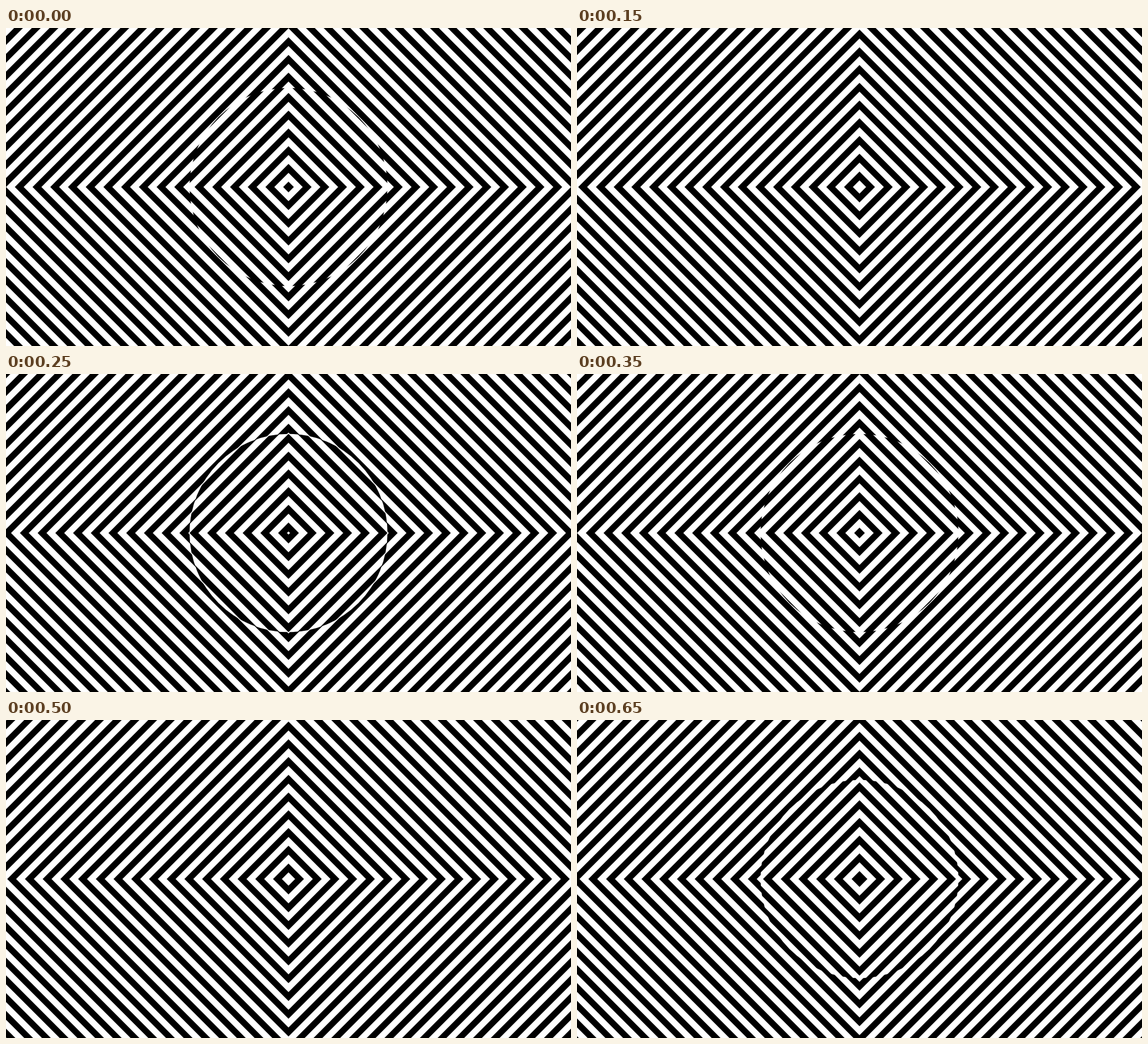
Write an HTML page with a canvas that moves like this. It is 998 px wide and 561 px high and loops after 700 ms.

```html
<!DOCTYPE html>
<html lang="en">
<head>
<meta charset="utf-8">
<title>Diamond rings</title>
<style>
  html, body { margin: 0; width: 998px; height: 561px; overflow: hidden; background: #fff; }
  canvas { position: absolute; left: 0; top: 0; }
  #inner { clip-path: circle(174.8px at 499px 280.5px); }
</style>
</head>
<body>
<canvas id="outer" width="998" height="561"></canvas>
<canvas id="inner" width="998" height="561"></canvas>
<script>
const W = 998, H = 561, CX = W / 2, CY = H / 2;
const PERIOD = 31.3, STEPS = 7, STEP_MS = 50;
const START = 9.45;
const SHIFT = PERIOD / STEPS;

const [outer, inner] = ['outer', 'inner'].map(id => document.getElementById(id).getContext('2d'));

function diamond(ctx, r) {
  ctx.moveTo(CX, CY - r);
  ctx.lineTo(CX + r, CY);
  ctx.lineTo(CX, CY + r);
  ctx.lineTo(CX - r, CY);
  ctx.closePath();
}

// Black rings half a period wide; phase is the outer edge of one of them.
function rings(ctx, phase, max) {
  ctx.fillStyle = '#fff';
  ctx.fillRect(0, 0, W, H);
  ctx.fillStyle = '#000';
  ctx.beginPath();
  const first = ((phase % PERIOD) + PERIOD) % PERIOD;
  for (let r = first; r < max + PERIOD; r += PERIOD) {
    diamond(ctx, r);
    if (r > PERIOD / 2) diamond(ctx, r - PERIOD / 2);
  }
  ctx.fill('evenodd');
}

let shown = -1;
function draw(now) {
  const step = Math.floor(now / STEP_MS) % STEPS;
  if (step !== shown) {
    shown = step;
    rings(outer, START + SHIFT * (step + 1), CX + CY);
    rings(inner, START - SHIFT * step, 250);
  }
}

let start;
function tick(now) {
  start ??= now;
  draw(now - start);
  requestAnimationFrame(tick);
}
draw(0);
requestAnimationFrame(tick);
</script>
</body>
</html>
```
